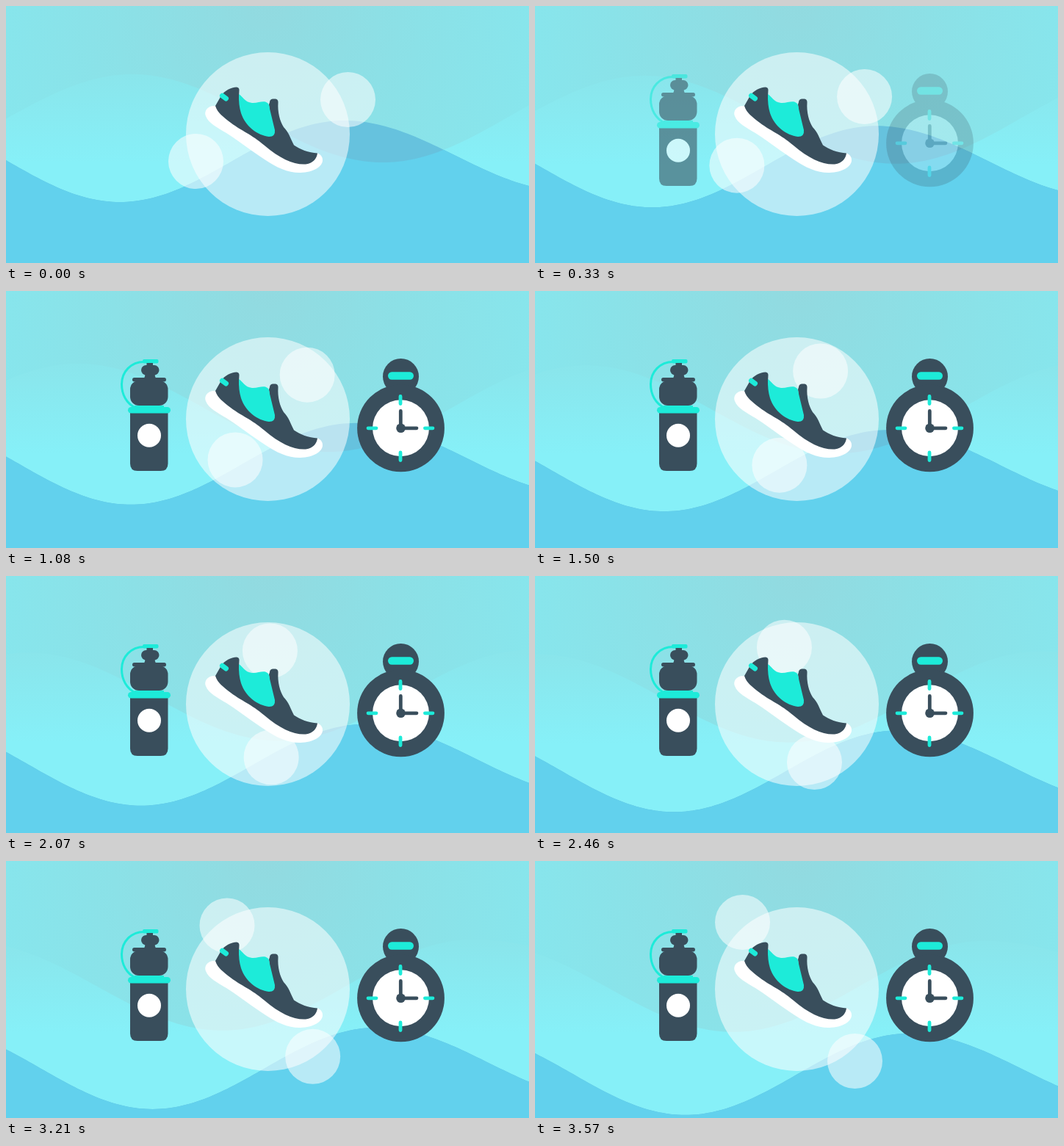
Animation, 712 px wide and 350 px high, one loop 3600 ms. Source, as an HTML page:

```html
<!DOCTYPE html>
<html lang="en">
<head>
<meta charset="utf-8">
<title>Sport gear</title>
<style>
  html, body { margin: 0; width: 100%; height: 100%; overflow: hidden; }
  svg { display: block; }
  .dark { fill: #394e5c; }
  .mint { fill: #1debd9; }
  .white { fill: #fff; }
  .glass { fill: #fff; fill-opacity: .55; }
  .line { fill: none; stroke-linecap: round; stroke-width: 4.8; }
  .mintLine { stroke: #1debd9; }
  .darkLine { stroke: #394e5c; }
</style>
</head>
<body>
<svg width="712" height="350" viewBox="0 0 712 350">
  <defs>
    <radialGradient id="sky" gradientUnits="userSpaceOnUse" cx="356" cy="0" r="420">
      <stop offset="0" stop-color="#92dae0"/>
      <stop offset=".5" stop-color="#8be1e7"/>
      <stop offset="1" stop-color="#86e7ee"/>
    </radialGradient>
    <linearGradient id="foam" gradientUnits="userSpaceOnUse" x1="0" y1="92" x2="0" y2="215">
      <stop offset="0" stop-color="#8ae5eb"/>
      <stop offset="1" stop-color="#86f0f8"/>
    </linearGradient>
    <path id="backWave"/>
    <path id="frontWave"/>
    <clipPath id="backClip"><use class="back" href="#backWave"/></clipPath>
  </defs>

  <rect width="712" height="350" fill="url(#sky)"/>
  <use class="back" href="#backWave" fill="url(#foam)"/>
  <use class="front" href="#frontWave" fill="#66c2de"/>
  <g clip-path="url(#backClip)"><use class="front" href="#frontWave" fill="#62d1ed"/></g>

  <g id="bottle">
    <path class="line mintLine" style="stroke-width:3" d="M188 96.5C170 96.5 157.5 110 157.5 127C157.5 141 164 153 176 159"/>
    <rect class="mint" x="186" y="93" width="21.5" height="5.5" rx="2"/>
    <rect class="dark" x="191.500" y="98" width="8.500" height="5"/>
    <rect class="dark" x="184" y="101" width="24.500" height="13.500" rx="6.700"/>
    <path class="dark" d="M189 113H203Q202 117 205 119H187Q190 117 189 113Z"/>
    <rect class="dark" x="172" y="118" width="46" height="5.500" rx="2.700"/>
    <rect class="dark" x="169" y="122" width="51.500" height="34" rx="12"/>
    <path class="dark" d="M169 165H220.500V235Q220.500 245 210.500 245H179Q169 245 169 235Z"/>
    <rect class="mint" x="175" y="156" width="40" height="4"/>
    <rect class="mint" x="166" y="158" width="58" height="8.600" rx="4.300"/>
    <circle class="white" cx="195" cy="196.800" r="16"/>
  </g>

  <g id="watch">
    <circle class="dark" cx="537.500" cy="116.500" r="24.500"/>
    <circle class="dark" cx="537.500" cy="186.800" r="59.400"/>
    <rect class="mint" x="520" y="110.300" width="35" height="10.400" rx="5.200"/>
    <circle class="white" cx="537.500" cy="186.800" r="38.500"/>
    <path class="line mintLine" d="M537 143.400V153.600M537 220V230.600M493 186.800H504M570.400 186.800H581"/>
    <path class="line darkLine" d="M537.300 163.400V186.800H559"/>
    <circle class="dark" cx="537.500" cy="186.800" r="6.300"/>
  </g>

  <circle class="glass" cx="356.500" cy="174.500" r="111.500"/>
  <circle class="glass" id="bubbleA" r="37.500"/>
  <circle class="glass" id="bubbleB" r="37.500"/>

  <g id="shoe">
    <path class="white" d="M285 136C275 135 269 143 272 150C276 160 287 165 300 173C320 186 335 198 352 209C368 220 385 227.500 401 227C418 226.500 431 219 431 210Q431 203 424 200.500L405 206L300 145Z"/>
    <path class="dark" d="M285 136L293 122C298 115 306 111 314 110.500Q317.500 111 317.500 114.500L317 124L345 165L362 172L358 134L359 131Q359 127 363 126.500H367Q370.500 127 370.500 131C369.500 145 373 157 378 165C385 172 387 180 392 189.500C400 195 412 200 424 200.500C423 207 419 214 408 215.500C392 216.500 373 208 352 190C333 174 322 171 306 159C296 151 288 146 285 136Z"/>
    <path class="mint" d="M317 120C322 123 325 131 335 132C344 132.500 350 128 356 132Q358.500 134 359 140L366 169Q367 178 358 178C342 176 326 164 320 146Q316.500 135 317 120Z"/>
    <path class="line mintLine" style="stroke-width:7" d="M294.500 122.200L299.500 126"/>
  </g>
</svg>
<script>
const LOOP = 3600, STEP = 30;
const $ = id => document.getElementById(id);

// Closed wave that eases through its crests and troughs along a cosine.
function wave(turns) {
  let d = '';
  for (let i = 1; i < turns.length; i++) {
    const [x0, y0] = turns[i - 1], [x1, y1] = turns[i];
    for (let k = 0; k <= 60; k++) {
      const u = k / 60, y = y0 + (y1 - y0) * (1 - Math.cos(Math.PI * u)) / 2;
      d += (d ? 'L' : 'M') + (x0 + (x1 - x0) * u).toFixed(2) + ' ' + y.toFixed(2);
    }
  }
  return d + `V400H${turns[0][0]}Z`;
}

$('backWave').setAttribute('d', wave([[-170, 213], [172, 93], [513, 213], [855, 89], [1235, 185]]));
$('frontWave').setAttribute('d', wave([[-150, 156], [155, 267], [460, 156], [765, 252]]));

function move(el, x, y) {
  el.setAttribute('transform', `translate(${x} ${y})`);
}

function fadeIn(t, delay) {
  const u = Math.min(1, Math.max(0, (t - delay) / 600));
  return u * u * (3 - 2 * u);
}

function draw(t) {
  const p = t / LOOP;
  document.querySelectorAll('.back').forEach(el => move(el, -245 * p, 20 * p));
  document.querySelectorAll('.front').forEach(el => move(el, 50 * p, 79.5 * p));
  move($('bubbleA'), 465.5 - 184.5 * p, 127.5 - 44.4 * p);
  move($('bubbleB'), 258.5 + 178.5 * p, 211.5 + 61.5 * p);
  $('bottle').setAttribute('opacity', fadeIn(t, 0));
  $('watch').setAttribute('opacity', fadeIn(t, 150));
}

const start = performance.now();
function tick() {
  const t = (performance.now() - start) % LOOP;
  draw(Math.floor(t / STEP) * STEP);
  requestAnimationFrame(tick);
}
tick();
</script>
</body>
</html>
```
